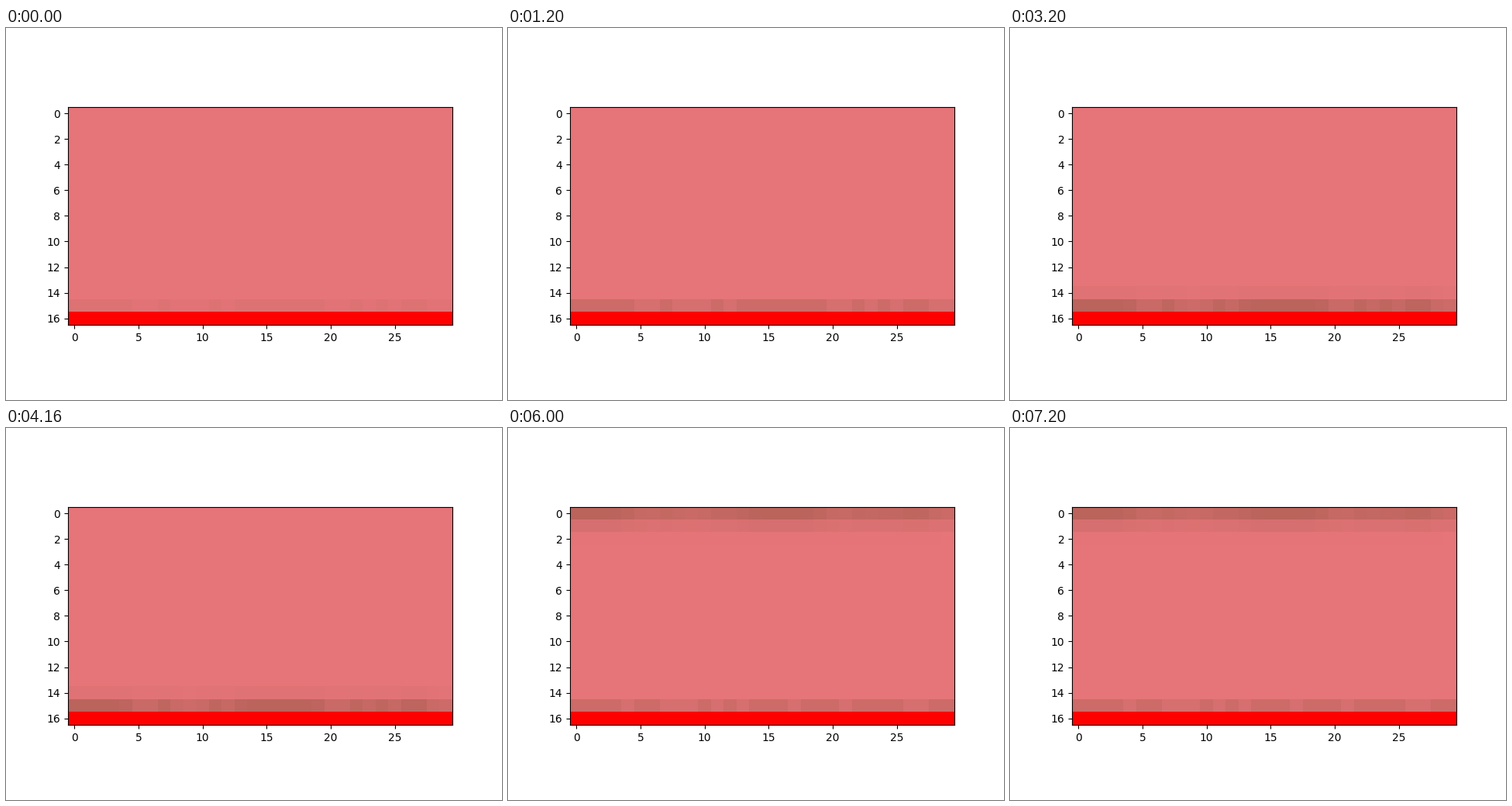
A matplotlib script for the animation above (8000 ms loop, 640 px wide and 480 px high).

```python
import numpy as np
import matplotlib.pyplot as plt
from matplotlib.animation import FuncAnimation

ROWS, COLS = 17, 30
STEP = 400  # ms per frame
FRAMES = 20
STAGE_STARTS = [0, 1200, 3200, 4800, 6000]
TURN = 3  # stage at which the first line wraps to the top

BASE = np.array([230, 117, 121])
DARK = np.array([186, 100, 92])
RED = np.array([255, 0, 0])
WEAK = .6  # strength of a gap relative to a full cell


def line(*gaps):
    cells = np.ones(COLS)
    cells[list(gaps)] = 0
    return cells


first = line(5, 6, 8, 9, 10, 12, 20, 21, 23, 25, 28, 29)
second = line(4, 7, 8, 9, 11, 13, 17, 21, 26, 27)


def blur(cells, passes):
    for _ in range(passes):
        cells = np.convolve(np.pad(cells, 1, mode="edge"), [.15, .7, .15],
                            mode="valid")
    return cells


def deposit(level, cells, age, edge, direction):
    """Darken a line that gets stronger, softer and deeper with age."""
    amount = min(.2 + .4 * age, 1)
    spread = min(.04 * age ** 2, .36)
    strength = WEAK + (1 - WEAK) * blur(cells, max(age - 1, 0))
    for k in range(3):
        fade = spread ** (k * (k + 1) / 2)
        level[edge + direction * k] += amount * fade * strength


def picture(stage):
    level = np.zeros((ROWS, COLS))
    bottom = ROWS - 2
    if stage < TURN:
        deposit(level, first, stage, bottom, -1)
    else:
        deposit(level, first, stage, 0, 1)
        deposit(level, second, stage - TURN, bottom, -1)
    img = BASE + level[..., None] * (DARK - BASE)
    img[-1] = RED
    return np.rint(img).astype(np.uint8)


fig, ax = plt.subplots(figsize=(6.4, 4.8), dpi=100)
image = ax.imshow(picture(0))


def draw(i):
    stage = np.searchsorted(STAGE_STARTS, i * STEP, side="right") - 1
    image.set_data(picture(stage))
    return [image]


anim = FuncAnimation(fig, draw, frames=FRAMES, interval=STEP, repeat=True,
                     repeat_delay=0)
plt.show()
```
